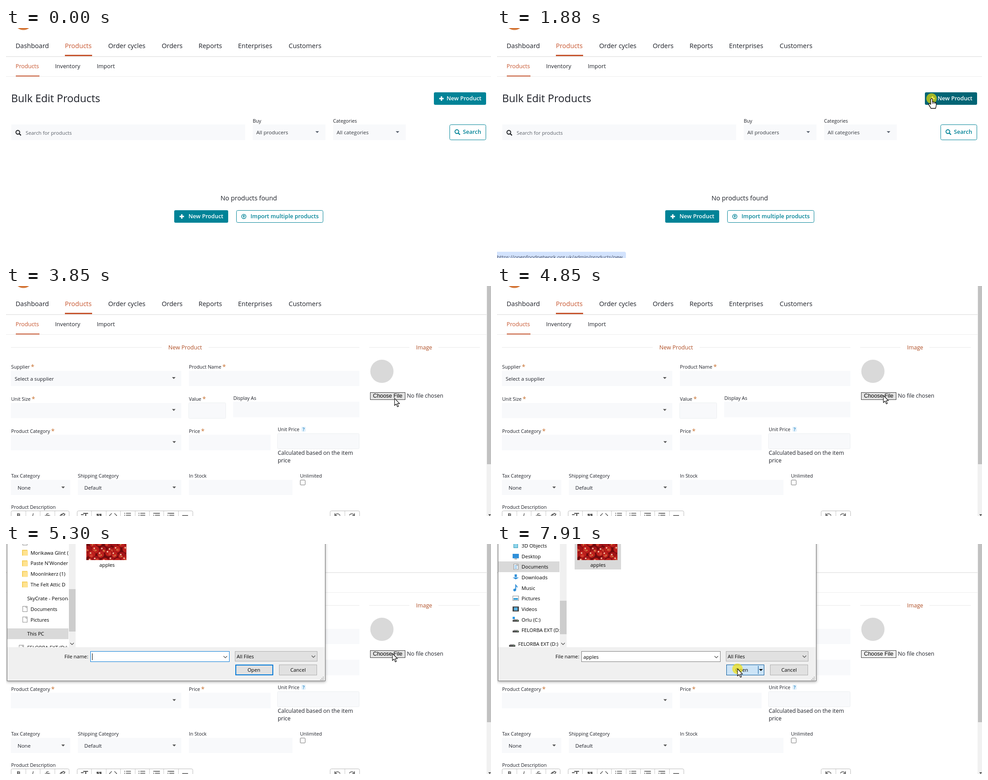
Recreate the animation shown at these times as an HTML page with a canvas. Size 1087x515 px, loop 7990 ms.

```html
<!DOCTYPE html>
<html lang="en">
<head>
<meta charset="utf-8">
<title>Adding a product image</title>
<style>
html, body { margin: 0; width: 100%; height: 100%; overflow: hidden; background: #fff; }
canvas { display: block; width: 1087px; height: 515px; }
</style>
</head>
<body>
<canvas id="stage" width="1087" height="515"></canvas>
<script>
const ctx = document.getElementById('stage').getContext('2d');
const LOOP = 7990;
const TEAL = '#008397', ORANGE = '#c6532c', INK = '#1c1f27', FIELD = '#f8f9fb', BLUE = '#0078d7';

// ---------- helpers ----------
function rect(x, y, w, h, fill) {
  ctx.fillStyle = fill;
  ctx.fillRect(x, y, w, h);
}
function frame(x, y, w, h, color, lw = 1) {
  ctx.strokeStyle = color;
  ctx.lineWidth = lw;
  ctx.strokeRect(x + lw / 2, y + lw / 2, w - lw, h - lw);
}
function box(x, y, w, h, fill, border, lw) {
  rect(x, y, w, h, fill);
  frame(x, y, w, h, border, lw);
}
function round(x, y, w, h, r, fill, border) {
  ctx.beginPath();
  ctx.roundRect(x, y, w, h, r);
  if (fill) { ctx.fillStyle = fill; ctx.fill(); }
  if (border) { ctx.strokeStyle = border; ctx.lineWidth = 1; ctx.stroke(); }
}
function disc(x, y, r, fill) {
  ctx.beginPath();
  ctx.arc(x, y, r, 0, Math.PI * 2);
  ctx.fillStyle = fill;
  ctx.fill();
}
function line(points, color, lw = 1) {
  ctx.beginPath();
  points.forEach(([x, y], i) => i ? ctx.lineTo(x, y) : ctx.moveTo(x, y));
  ctx.strokeStyle = color;
  ctx.lineWidth = lw;
  ctx.stroke();
}
function text(s, x, y, size, color = INK, weight = 400, align = 'left', family = '"Open Sans"') {
  ctx.font = `${weight} ${size}px ${family}, sans-serif`;
  ctx.textAlign = align;
  ctx.fillStyle = color;
  ctx.fillText(s, x, y);
}
function caretDown(x, y, color = '#555', w = 4) {
  ctx.beginPath();
  ctx.moveTo(x - w, y - 2);
  ctx.lineTo(x + w, y - 2);
  ctx.lineTo(x, y + 2.3);
  ctx.fillStyle = color;
  ctx.fill();
}
function chevron(x, y) {
  line([[x - 4, y - 2], [x, y + 2], [x + 4, y - 2]], '#444', 1.1);
}
function plus(x, y) {
  rect(x - 5, y - 1.5, 10, 3, '#fff');
  rect(x - 1.5, y - 5, 3, 10, '#fff');
}
function lens(x, y, color) {
  ctx.beginPath();
  ctx.arc(x - 1, y - 1, 4.2, 0, Math.PI * 2);
  ctx.strokeStyle = color;
  ctx.lineWidth = 1.9;
  ctx.stroke();
  line([[x + 2, y + 2], [x + 6, y + 6]], color, 2.4);
}
const clamp = v => Math.max(0, Math.min(1, v));
const ease = u => u * u * (3 - 2 * u);
const inside = (p, x, y, w, h) => p.x >= x && p.x < x + w && p.y >= y && p.y < y + h;

// ---------- pages ----------
function header(width) {
  rect(0, 0, 1087, 515, '#fff');
  disc(39, -16.5, 21, '#d5793c');
  const nav = [['Dashboard', 21.5], ['Products', 132], ['Order cycles', 229], ['Orders', 349],
    ['Reports', 431.5], ['Enterprises', 520], ['Customers', 633.5]];
  for (const [s, x] of nav) text(s, x, 45, 14.5, x === 132 ? ORANGE : INK, 500);
  rect(0, 63.5, width, 1, '#d5d5d5');
  rect(132, 60, 61, 3, ORANGE);
  for (const [s, x] of [['Products', 21.5], ['Inventory', 110], ['Import', 203.5]])
    text(s, x, 89.5, 12.7, x === 21.5 ? ORANGE : INK, 500);
  rect(0, 108, width, 1, '#ededed');
  rect(22, 106.5, 53, 2, ORANGE);
}

function listPage(hover) {
  header(1087);
  text('Bulk Edit Products', 11.5, 166, 23.6, INK, 500);
  round(959, 144, 117, 28, 3, hover ? '#006474' : TEAL);
  plus(976, 158);
  text('New Product', 987.5, 162, 12.6, '#fff', 600);

  rect(12, 216, 524, 35, FIELD);
  lens(27.5, 234.5, '#15181c');
  text('Search for products', 44, 239, 11.3, '#5d636b');
  for (const [label, value, x] of [['Buy', 'All producers', 553], ['Categories', 'All categories', 733]]) {
    text(label, x, 211.5, 10.8);
    rect(x, 216, 163, 35, FIELD);
    text(value, x + 8, 238, 11.6, '#33373d');
    caretDown(x + 144.5, 233, '#5c6470');
  }
  round(994.5, 216.5, 81, 34, 3, '#fff', TEAL);
  lens(1011.5, 233, TEAL);
  text('Search', 1024, 237, 12.6, TEAL, 600);

  text('No products found', 544, 386, 14.4, INK, 500, 'center');
  round(377, 408, 121, 28, 3, TEAL);
  plus(394, 422);
  text('New Product', 409, 426, 12.6, '#fff', 600);
  round(516.5, 408.5, 194, 27, 3, '#fff', TEAL);
  ctx.beginPath();
  ctx.arc(533, 422, 4.8, 0, Math.PI * 2);
  ctx.strokeStyle = TEAL;
  ctx.lineWidth = 1.4;
  ctx.stroke();
  line([[533, 425], [533, 420]], TEAL, 1.5);
  line([[530.8, 421.8], [533, 419.6], [535.2, 421.8]], TEAL, 1.3);
  text('Import multiple products', 548, 426, 12.6, TEAL, 600);
}

function label(s, x, y, required) {
  text(s, x, y, 10.8, INK, 500);
  if (required) {
    const w = ctx.measureText(s).width;
    text('*', x + w + 2.5, y + .5, 14, '#c8702f');
  }
}

function toolbar() {
  const groups = [[11, 4, 32.5], [159, 8, 32.4], [726, 2, 33]];
  for (const [x, n, w] of groups) {
    round(x + .5, 503.5, n * w, 30, 3, '#fff', '#b9b9b9');
    for (let i = 1; i < n; i++) rect(Math.round(x + i * w), 504, 1, 11, '#c8c8c8');
  }
  const c = '#5a5a5a';
  text('B', 28, 518, 13, c, 700, 'center');
  text('I', 60, 518, 13, c, 'italic 600', 'center');
  text('S', 93, 518, 13, c, 600, 'center');
  rect(87, 513, 12, 1, c);
  line([[121, 515], [124, 511], [127, 513]], c, 1.8);
  line([[124, 514], [128, 509], [132, 511], [129, 515]], c, 1.8);
  rect(173, 508, 11, 2.2, c);
  rect(177.5, 508, 2.4, 8, c);
  rect(168, 511, 6, 2, c);
  for (const x of [203, 209]) {
    rect(x, 510, 5, 4, c);
    rect(x + 2, 513, 3, 2, c);
  }
  line([[237, 509], [232, 514], [233, 515]], c, 1.5);
  line([[243, 509], [248, 514], [247, 515]], c, 1.5);
  [272, 304, 337, 369].forEach((x, i) => {
    rect(x - 7, 508, i > 1 ? 14 : 2, 1.6, c);
    rect(x - 3, 508, 11, 1.6, c);
    rect(x - 7, 512.5, 2, 1.6, c);
    rect(x - 3, 512.5, 11, 1.6, c);
  });
  rect(395, 513, 13, 1.6, c);
  for (const [x, d] of [[743, 1], [775, -1]]) {
    line([[x - 6 * d, 509], [x - 6 * d, 514], [x - d, 514]], c, 1.6);
    ctx.beginPath();
    ctx.arc(x, 516, 6, Math.PI * 1.15, Math.PI * 1.9);
    ctx.stroke();
  }
}

function formPage(ready, hoverFile) {
  header(1077);
  for (const [x, w] of [[11, 338], [454, 338], [814, 90], [969, 93]]) rect(x, 137, w, 1, '#e9e9e9');
  text('New Product', 401.5, 142, 12.6, '#b04f26', 500, 'center');
  text('Image', 937, 142, 12.6, '#b04f26', 500, 'center');

  const fields = [[11, 190, 382, 34], [410, 190, 382, 34], [11, 262, 382, 34], [509, 259, 283, 35],
    [11, 333, 382, 35], [410, 333, 183, 35], [11, 434, 133, 34], [161, 434, 232, 34], [410, 434, 232, 34]];
  for (const f of fields) rect(...f, FIELD);
  round(409.5, 261.5, 83, 35, 2, FIELD, '#eceff1');
  round(608.5, 330.5, 183, 34, 2, FIELD, '#eceff1');

  label('Supplier', 11.5, 185, true);
  label('Product Name', 410, 185, true);
  label('Unit Size', 11.5, 257, true);
  label('Value', 410, 257, true);
  label('Display As', 509.5, 255);
  label('Product Category', 11.5, 329, true);
  label('Price', 410, 329, true);
  label('Unit Price', 609, 325);
  round(662, 315, 10, 11, 2, '#e3f1fb');
  text('?', 667, 325, 10.5, '#4a9bd0', 700, 'center');
  label('Tax Category', 11.5, 429);
  label('Shipping Category', 161, 429);
  label('In Stock', 410, 429);
  label('Unlimited', 659, 429);
  label('Product Description', 11.5, 499);
  text('Calculated based on the item', 609, 378, 12.45);
  text('price', 609, 395, 12.45);
  round(659.5, 434.5, 11, 11, 1.5, '#fff', '#767676');

  if (ready) {
    text('Select a supplier', 19.5, 212, 11.5);
    text('None', 26, 456, 11.5);
    text('Default', 175.5, 456, 11.5);
    for (const [x, y] of [[376, 206], [376, 277.5], [377, 349.5], [128, 451], [377, 451]]) caretDown(x, y);
    toolbar();
  }

  disc(842.5, 191, 26, '#d9d9d9');
  box(816, 238, 79, 17, hoverFile ? '#e3e3e3' : '#efefef', '#3a3a3a');
  text('Choose File', 855.5, 250, 12.35, '#000', 400, 'center', '"Liberation Sans"');
  text('No file chosen', 898.5, 250, 12.3);

  rect(1077, 0, 10, 515, '#f1f1f1');
  rect(1078, 0, 9, ready ? 399 : 430, '#c1c1c1');
  caretDown(1084, 513, '#505050', 3);
}

function status(s, w, alpha) {
  ctx.globalAlpha = alpha;
  round(-4, 501, w + 4, 24, 4, '#d3e3fd');
  text(s, 0, 517, 11.2, '#475067');
  ctx.globalAlpha = 1;
}

// ---------- file dialog ----------
function folder(y) {
  rect(36, y - 6, 12, 13, '#f5cf5c');
  rect(38, y - 4, 11, 11, '#ffe391');
}
function sheet(x, y) {
  box(x - 5, y - 7, 11, 13, '#fff', '#8a8a8a');
  line([[x + 2.5, y - 6.5], [x + 2.5, y - 3.5], [x + 5.5, y - 3.5]], '#8a8a8a');
}
function drive(x, y) {
  rect(x - 5, y - 3, 10, 2, '#b4b4b4');
  rect(x - 7, y - 1, 14, 4, '#505050');
  rect(x + 3, y, 2, 1, '#7fe07f');
}

function upperPane() {
  sheet(42, -3);
  const names = ['Morikawa Glint (1)', "Paste N'Wonder", 'MoonInkerz (1)', 'The Felt Attic D'];
  names.forEach((s, i) => {
    folder(19 + i * 23.7);
    text(s, 55, 23.5 + i * 23.7, 11.2, '#000');
  });
  text('SkyCrate - Personal', 47.5, 126, 11.2, '#000');
  ['Documents', 'Pictures'].forEach((s, i) => {
    sheet(42, 146 + i * 23.7);
    text(s, 55, 150 + i * 23.7, 11.2, '#000');
  });
  rect(3, 189, 137, 24, '#d9d9d9');
  text('This PC', 47.5, 205, 11.2, '#000');
  sheet(34, 233);
  text('FELORBA EXT (D:)', 47.5, 236, 11.2, '#000');
}

function lowerPane() {
  rect(3, 39, 137, 24, '#d9d9d9');
  const names = ['3D Objects', 'Desktop', 'Documents', 'Downloads', 'Music', 'Pictures', 'Videos',
    'Orlu (C:)', 'FELORBA EXT (D:)'];
  names.forEach((s, i) => text(s, 55, 8 + i * 23.65, 11.2, '#000'));
  text('FELORBA EXT (D:)', 47.5, 228, 11.2, '#000');
  const b = '#2f8fd8';
  box(37, -2, 10, 11, '#8fd4ea', '#2f9ab8');
  rect(35, 22, 14, 10, b);
  rect(39, 33, 6, 1, '#555');
  sheet(42, 51.5);
  for (let i = 0; i < 3; i++) rect(39, 48 + i * 3, 6, 1, b);
  rect(39.5, 68, 5, 6, b);
  caretDown(42, 77, b, 7);
  line([[42, 104], [42, 92], [46, 97]], b, 2);
  disc(39.5, 103, 3, b);
  box(35, 116, 14, 11, '#fff', '#8a8a8a');
  rect(37, 121, 10, 4, '#3da0d6');
  box(35, 140, 14, 11, '#4a4a4a', '#333');
  rect(38, 142, 8, 7, '#58b0e0');
  drive(42, 171);
  rect(35, 163, 5, 5, '#2b9ae6');
  drive(42, 195);
  drive(34, 227);
}

function apples() {
  ctx.save();
  ctx.beginPath();
  ctx.rect(180, 0, 89.5, 36);
  ctx.clip();
  rect(180, 0, 90, 36, '#6d0a0c');
  let seed = 23;
  const rnd = () => (seed = seed * 16807 % 2147483647) / 2147483647;
  for (let row = 0; row < 4; row++) {
    for (let col = 0; col < 7; col++) {
      const x = 178 + col * 16 + row % 2 * 8 + rnd() * 7 - 3;
      const y = row * 12 + rnd() * 8 - 4;
      const r = 7.5 + rnd() * 2, turn = rnd() * 6.3;
      disc(x, y, r, '#7f0d10');
      disc(x, y - .6, r - .9, rnd() > .4 ? '#bd1f1c' : '#a31418');
      disc(x + 3 * Math.cos(turn), y + 3 * Math.sin(turn), 3.2, '#d2402f');
      if (rnd() > .35) disc(x - 2.5, y - 3.5, 1.7, '#f3d3b4');
      if (rnd() > .4) disc(x + 2 * Math.sin(turn), y + 1, 1.4, '#c99a4a');
    }
  }
  ctx.restore();
}

function dialog(t, mouse) {
  const late = t >= 5380, picked = t >= 6510, pressed = t >= 7760;
  ctx.save();
  const p = clamp((t - 4930) / 300);
  if (p < 1) {
    const k = .92 + .08 * ease(p);
    ctx.globalAlpha = p;
    ctx.translate(358, 60);
    ctx.scale(k, k);
    ctx.translate(-358, -60);
  }
  ctx.shadowColor = 'rgba(0,0,0,.35)';
  ctx.shadowBlur = 6;
  ctx.shadowOffsetY = 1.5;
  rect(2, -60, 714, 367, '#f0f0f0');
  ctx.shadowColor = 'transparent';
  frame(2, -60, 714, 367, '#737373');
  rect(3, -50, 711, 281, '#fff');

  ctx.save();
  ctx.beginPath();
  ctx.rect(3, 0, 137, 231);
  ctx.clip();
  late ? lowerPane() : upperPane();
  ctx.restore();
  rect(141, -50, 15, 281, '#f0f0f0');
  late ? rect(141, 127, 15, 75, '#cdcdcd') : rect(141, 101, 15, 95, '#cdcdcd');
  chevron(148, 223.5);

  if (pressed) rect(174, -5, 104, 62, '#d9d9d9');
  else if (picked) box(174, -5, 104, 62, '#cce8ff', '#99d1ff');
  else if (inside(mouse, 174, 0, 104, 57)) rect(174, -5, 104, 62, '#e5f3ff');
  apples();
  text('apples', 226.5, 51, 11.2, '#000', 400, 'center');

  text('File name:', 131, 256, 11.2, '#000');
  box(189, 240, 312, 24, '#fff', pressed ? '#7a7a7a' : BLUE);
  if (picked) text('apples', 193.5, 256.5, 11.2, '#000');
  if (!pressed) rect(193, 245, 1, 15, '#000');
  chevron(491.5, 253);

  const overType = inside(mouse, 513, 240, 185, 23);
  box(513, 240, 185, 23, overType ? '#e5f1fb' : '#e1e1e1', overType ? BLUE : '#adadad');
  text('All Files', 517, 256, 11.2, '#000');
  chevron(689, 252);

  const overOpen = inside(mouse, 514, 270, 84, 24);
  if (pressed) box(514, 270, 85, 24, '#cce4f7', '#005499');
  else box(514, 270, 85, 24, overOpen ? '#e5f1fb' : '#e1e1e1', BLUE, overOpen ? 1 : 2);
  text('Open', late ? 548.5 : 555.5, 286, 11.2, '#000', 400, 'center');
  if (late) {
    rect(585, 273, 1, 18, pressed ? '#005499' : '#333');
    caretDown(591.5, 282, '#000', 4.5);
  }
  box(612, 270, 85, 24, '#e1e1e1', '#adadad');
  text('Cancel', 654.5, 286, 11.2, '#000', 400, 'center');
  for (let i = 0; i < 3; i++)
    for (let j = 0; j <= i; j++) rect(710 - j * 3, 297 + i * 3, 2, 2, '#b5b5b5');
  ctx.restore();
}

// ---------- pointer ----------
const ARROW = new Path2D('M0 0V16L3.7 12.6L6.5 19L9 18L6.3 11.8H11.4Z');
const HAND = new Path2D('M-2 2Q-2 0 0 0Q2 0 2 2V8Q3.5 6.8 5 8Q7 7.3 8 9Q10.5 8.8 10.5 11V15' +
  'Q10 18 9 22H-1.5Q-4 17 -6.5 13.5Q-6.5 10.5 -4.5 11L-2 13Z');

// start, end, step count, from, bend, to
const MOVES = [
  [130, 840, 10, [840, 545], [900, 260], [974, 158]],
  [3380, 4000, 9, [974, 158], [880, 281], [866, 245]],
  [5630, 6250, 9, [866, 245], [540, 130], [231, 27]],
  [6720, 7430, 10, [231, 27], [560, 140], [539, 276]],
  [7530, 7580, 2, [539, 276], [539, 278], [539, 279.5]],
];
const CLICKS = [[1880, 2040, 2110], [4230, 4460, 4620], [6510, 6720, 6870], [7760, 7990, 8100]];

function pointer(t) {
  let pos = { x: -99, y: -99 };
  for (const [t0, t1, n, a, b, c] of MOVES) {
    if (t < t0) break;
    const step = Math.floor((t - t0) / (t1 - t0) * (n - 1) + 1e-6) + 1;
    const u = ease(clamp(step / n)), v = 1 - u;
    const at = i => v * v * a[i] + 2 * u * v * b[i] + u * u * c[i];
    pos = { x: at(0), y: at(1) };
  }
  return pos;
}

function drawPointer(t, { x, y }, hand) {
  for (const [on, hold, off] of CLICKS) {
    if (t < on || t >= off) continue;
    const fade = t < hold ? 1 : .55 * (1 - (t - hold) / (off - hold));
    disc(x, y, 11.7, `rgba(245,225,0,${.66 * fade})`);
  }
  ctx.save();
  ctx.translate(x, y);
  const shape = hand ? HAND : ARROW;
  ctx.lineJoin = 'round';
  ctx.lineWidth = hand ? 1.3 : 1.1;
  ctx.fillStyle = '#fff';
  ctx.strokeStyle = '#000';
  ctx.fill(shape);
  ctx.stroke(shape);
  if (hand) for (const k of [2, 5, 8]) line([[k, 8.5], [k, 12]], '#000');
  ctx.restore();
}

// ---------- loop ----------
function draw(t) {
  const mouse = pointer(t);
  const onNew = inside(mouse, 959, 144, 117, 28);
  if (t < 2510) {
    listPage(onNew);
    if (t >= 2110) status('Waiting for openfoodnetwork.org.uk...', 289, 1);
    else if (onNew) status('https://openfoodnetwork.org.uk/admin/products/new', 289, 1);
  } else {
    formPage(t >= 2680, t < 5380 && inside(mouse, 816, 238, 79, 17));
    if (t < 3150) status('Waiting for sessions.bugsnag.com...', 358, t < 3070 ? 1 : .5);
    if (t >= 5000) dialog(t, mouse);
  }
  drawPointer(t, mouse, t < 3380 && onNew);
}

const start = performance.now();
function tick() {
  draw((performance.now() - start) % LOOP);
  requestAnimationFrame(tick);
}
tick();
</script>
</body>
</html>
```
